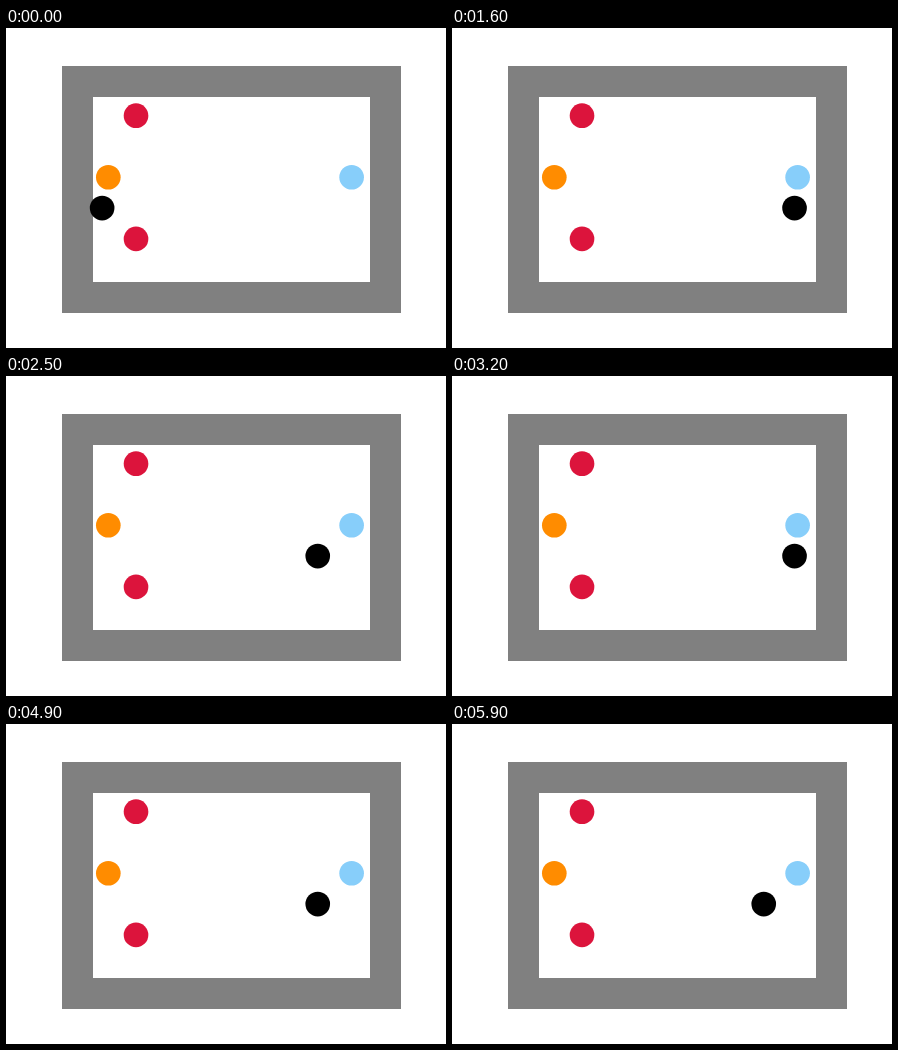
Recreate the animation shown at these times as an HTML page. Size 440 by 320 pixels, loop 6 s.

```html
<!DOCTYPE html>
<html lang="en">
<head>
<meta charset="utf-8">
<title>Grid walker</title>
<style>
  html, body { margin: 0; width: 100%; height: 100%; overflow: hidden; background: #fff; }
  svg { display: block; }
</style>
</head>
<body>
<svg id="stage" width="440" height="320" viewBox="0 0 440 320">
  <rect width="440" height="320" fill="#fff"/>
  <rect x="56" y="38" width="339" height="247" fill="#808080"/>
  <rect x="87" y="69" width="277" height="185" fill="#fff"/>
</svg>
<script>
  const CELL = 30.8, LEFT = 56.1, TOP = 38.4;
  const STEP = 100, STEPS = 60, FAR = 8;
  const stage = document.getElementById('stage');
  const px = col => LEFT + col * CELL;

  function disc(col, row, fill) {
    const c = document.createElementNS('http://www.w3.org/2000/svg', 'circle');
    c.setAttribute('cx', px(col));
    c.setAttribute('cy', TOP + row * CELL);
    c.setAttribute('r', CELL * 0.4);
    c.setAttribute('fill', fill);
    return stage.appendChild(c);
  }

  disc(2.4, 1.6, '#dc143c');
  disc(2.4, 5.6, '#dc143c');
  disc(1.5, 3.6, '#ff8c00');
  disc(9.4, 3.6, '#87cefa');
  const walker = disc(1.3, 4.6, '#000');

  // Walk right one cell per step, then bounce between the last two cells.
  function render(ms) {
    const n = Math.floor(ms / STEP) % STEPS;
    const cell = n <= FAR ? n : FAR - n % 2;
    walker.setAttribute('cx', px(1.3 + cell));
  }

  const start = performance.now();
  function tick() {
    render(performance.now() - start);
    requestAnimationFrame(tick);
  }
  tick();
</script>
</body>
</html>
```
